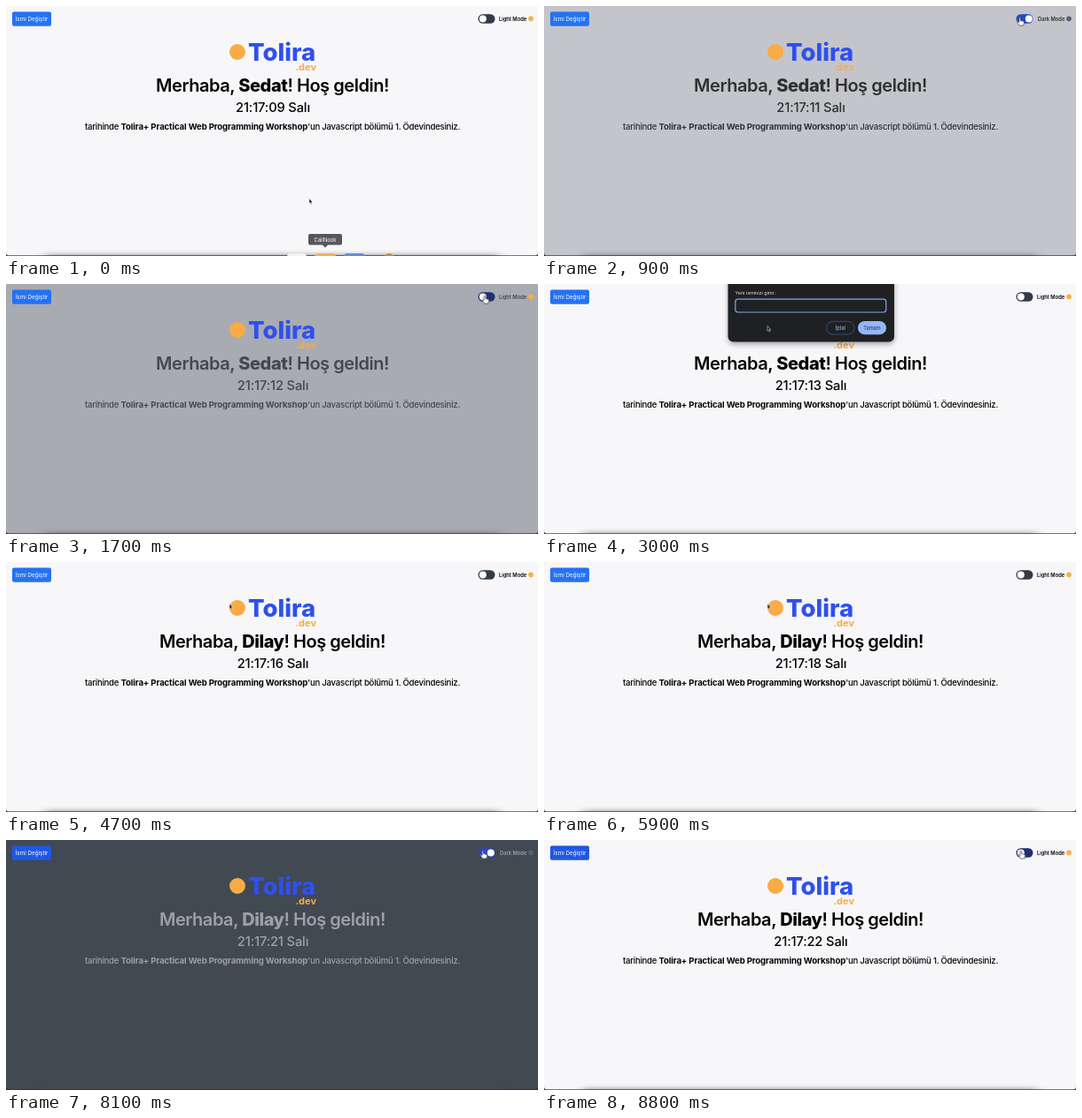
An HTML page for the animation above (8.9 s loop, 600 by 283 pixels).

```html
<!DOCTYPE html>
<html lang="tr">
<head>
<meta charset="utf-8">
<title>Merhaba</title>
<style>
html, body { margin: 0; width: 100%; height: 100%; overflow: hidden; background: #f7f6f9; }
svg { display: block; width: 100%; height: 100%; font-family: Inter, "Open Sans", sans-serif;
  background: #f7f6f9; color: #050505; animation: theme 8.9s ease-in-out infinite; }
text { fill: currentColor; }
.mid { text-anchor: middle; }
.bold { font-weight: 700; }

#heading { font-size: 20px; font-weight: 600; letter-spacing: -.46px; }
#heading .bold { font-weight: 800; }
#clock { font-size: 14.7px; font-weight: 450; letter-spacing: -.15px; }
#intro { font-size: 9.6px; font-weight: 500; letter-spacing: -.25px; }
#intro .bold { letter-spacing: -.12px; font-weight: 700; }
.brand { font-size: 27.5px; font-weight: 800; fill: #2f50ee; }
.domain { font-size: 11px; font-weight: 700; fill: #f9ab45; }
.label { font-size: 5.75px; font-weight: 600; }
.white { fill: #fff; }
.pale { fill: #e3e3e3; }
.cancel { fill: #a8c7fa; }
.accept { fill: #123062; }

.button, .track, .knob, .emoji, .light, .dark, .prompt, .dock, .cursor, .arrow, .hand {
  animation: 8.9s infinite; }
.button { fill: #2472f4; animation-name: button; animation-timing-function: step-end; }
.track { fill: #343b47; animation-name: track; animation-timing-function: step-end; }
.knob { fill: #fff; animation-name: knob; animation-timing-function: ease-in-out; }
.emoji { fill: #f8b13c; animation-name: emoji; animation-timing-function: step-end; }
.light { animation-name: light; animation-timing-function: step-end; }
.dark { visibility: hidden; animation-name: dark; animation-timing-function: step-end; }
.prompt { visibility: hidden; animation-name: prompt; animation-timing-function: step-end; }
.dock { animation-name: dock; animation-timing-function: ease-in; }
.cursor { animation-name: travel; animation-timing-function: ease-in-out; }
.arrow { animation-name: arrow; animation-timing-function: step-end; }
.hand { visibility: hidden; animation-name: hand; animation-timing-function: step-end; }

@keyframes theme {
  0%, 8.43%, 21.22%, 87.42%, 98.31%, 100% { background-color: #f7f6f9; color: #050505; }
  13.48%, 16.17%, 92.47%, 93.26% { background-color: #1c2531; color: #bdc0c4; }
}
@keyframes button {
  0%, 29.2% { fill: #2472f4; }
  27%, 72.6%, 100% { fill: #1f58e2; }
}
@keyframes track {
  0%, 21.9% { fill: #343b47; }
  7%, 16.17%, 86.2%, 93.26%, 100% { fill: #20306e; }
  8.43%, 87.42% { fill: #2448c8; }
}
@keyframes knob {
  0%, 8.43%, 17.3%, 87.42%, 94.4%, 100% { transform: none; }
  9.5%, 16.17%, 88.5%, 93.26% { transform: translateX(9px); }
}
@keyframes emoji {
  0%, 16.17%, 93.26%, 100% { fill: #f8b13c; }
  8.43%, 87.42% { fill: #596072; }
}
@keyframes light {
  0%, 16.17%, 93.26%, 100% { visibility: visible; }
  8.43%, 87.42% { visibility: hidden; }
}
@keyframes dark {
  0%, 16.17%, 93.26%, 100% { visibility: hidden; }
  8.43%, 87.42% { visibility: visible; }
}
@keyframes prompt {
  0%, 47.75%, 100% { visibility: hidden; }
  29.2% { visibility: visible; }
}
@keyframes dock {
  0%, 1.1% { transform: none; }
  3.5%, 100% { transform: translateY(28px); }
}
@keyframes travel {
  0%, 1.1% { transform: translate(342px, 218px); }
  7.3% { transform: translate(536px, 13px); }
  16.9%, 20.8% { transform: translate(540px, 13px); }
  27.5%, 29.2% { transform: translate(39px, 16px); }
  33.1%, 66.3% { transform: translate(252px, 47.5px); }
  73%, 81.5% { transform: translate(39px, 16px); }
  86.5%, 100% { transform: translate(538px, 12px); }
}
@keyframes arrow {
  0%, 20.8%, 29.2%, 81.5% { visibility: visible; }
  7%, 27%, 72.6%, 86.2%, 100% { visibility: hidden; }
}
@keyframes hand {
  0%, 20.8%, 29.2%, 81.5% { visibility: hidden; }
  7%, 27%, 72.6%, 86.2%, 100% { visibility: visible; }
}
</style>
</head>
<body>
<svg viewBox="0 0 600 283" preserveAspectRatio="none">
  <defs>
    <filter id="blur" x="-10%" y="-20%" width="120%" height="150%">
      <feGaussianBlur stdDeviation="3"/>
    </filter>
    <filter id="shade" x="-10%" y="-200%" width="120%" height="500%">
      <feGaussianBlur stdDeviation="6 2.5"/>
    </filter>
  </defs>

  <rect class="button" x="7" y="6.4" width="44" height="16.4" rx="2"/>
  <text class="mid white" x="29" y="17" font-size="6.3">İsmi Değiştir</text>

  <rect class="track" x="532.5" y="9.3" width="19" height="10.4" rx="5.2"/>
  <circle class="knob" cx="537.8" cy="14.5" r="4"/>
  <text class="label light" x="556" y="16.7">Light Mode</text>
  <text class="label dark" x="557" y="16.7">Dark Mode</text>
  <circle class="emoji" cx="592" cy="14.4" r="2.8"/>

  <circle cx="261" cy="52" r="9" fill="#f9ab45"/>
  <text class="brand" x="273" y="62">Tolira</text>
  <text class="domain" x="350" y="73" text-anchor="end">.dev</text>

  <text id="heading" class="mid" x="300.5" y="97">Merhaba, <tspan id="name" class="bold">Sedat</tspan>! Hoş geldin!</text>
  <text id="clock" class="mid" x="301" y="120">21:17:09 Salı</text>
  <text id="intro" class="mid" x="300.5" y="139.700">tarihinde <tspan class="bold">Tolira+ Practical Web Programming Workshop</tspan>'un Javascript bölümü 1. Ödevindesiniz.</text>

  <rect x="44" y="281" width="512" height="6" fill="#555" opacity=".5" filter="url(#shade)"/>
  <path d="M0 279q0 3.200 3.200 3.200h593.600q3.200 0 3.200-3.200v4h-600z" fill="#222" opacity=".8"/>

  <g class="dock">
    <rect x="317" y="280" width="22" height="12" rx="4" fill="#f4f4f4"/>
    <rect x="348" y="280" width="24" height="12" rx="4" fill="#f3b154"/>
    <rect x="381" y="280" width="24" height="12" rx="4" fill="#5b8fe0"/>
    <circle cx="432" cy="286" r="6" fill="#c98a3c"/>
    <path d="M343 258h34q2 0 2 2v8.500q0 2-2 2h-14l-3 3-3-3h-14q-2 0-2-2v-8.500q0-2 2-2z" fill="#56575b"/>
    <text class="mid white" x="360" y="266.500" font-size="5.8">CallNook</text>
  </g>

  <g class="prompt">
    <rect x="208" y="-8" width="187" height="76" rx="6" opacity=".35" filter="url(#blur)"/>
    <rect x="207.500" y="-8" width="187.500" height="73.500" rx="6" fill="#1f2022"/>
    <text class="pale" x="215.500" y="11.500" font-size="5.4">Yeni isminizi girin:</text>
    <rect x="215.800" y="17.200" width="170" height="14.800" rx="3" fill="#202124" stroke="#7ba9ee" stroke-width="1.2"/>
    <text id="entry" class="white" x="220" y="26.700" font-size="5.800"></text>
    <rect x="318.500" y="42.300" width="31.500" height="14.700" rx="7.350" fill="none" stroke="#2f5f9c" stroke-width=".8"/>
    <text class="mid cancel" x="334.300" y="51.700" font-size="5.600">İptal</text>
    <rect x="354" y="42" width="32" height="15.300" rx="7.650" fill="#94b7f6"/>
    <text class="mid accept" x="370" y="51.700" font-size="5.600">Tamam</text>
  </g>

  <g class="cursor" stroke-linejoin="round">
    <path class="arrow" d="M0 0v5.600l1.300-1.200.9 2 .9-.4-.9-1.900h1.700z" fill="#111" stroke="#fff" stroke-width=".5"/>
    <g transform="scale(1.25)">
      <path class="hand" d="M-.7.500q.7-.9 1.300 0v2.300l2.500.6q.8.3.7 1.100l-.5 2.700h-3.700l-2-2.900q0-.8.8-.6l.9.700z" fill="#fff" stroke="#222" stroke-width=".5"/>
    </g>
  </g>
</svg>
<script>
const LOOP = 8900, OPEN = 2600, CLOSE = 4250;
const oldName = 'Sedat', newName = 'Dilay';
const byId = id => document.getElementById(id);
const setText = (id, value) => {
  const node = byId(id);
  if (node.textContent !== value) node.textContent = value;
};

function draw(now) {
  const t = now % LOOP;
  // The open prompt blocks the page, so its clock stands still.
  const shown = t >= OPEN && t < CLOSE ? OPEN : t;
  const seconds = Math.floor(9.8 + shown * 0.00146);
  setText('clock', `21:17:${String(seconds).padStart(2, '0')} Salı`);
  setText('name', t < CLOSE ? oldName : newName);
  const typed = Math.max(0, Math.floor((t - 3100) / 170));
  setText('entry', newName.slice(0, typed));
}

let start;
function tick(now) {
  start ??= now;
  draw(now - start);
  requestAnimationFrame(tick);
}
requestAnimationFrame(tick);
</script>
</body>
</html>
```
